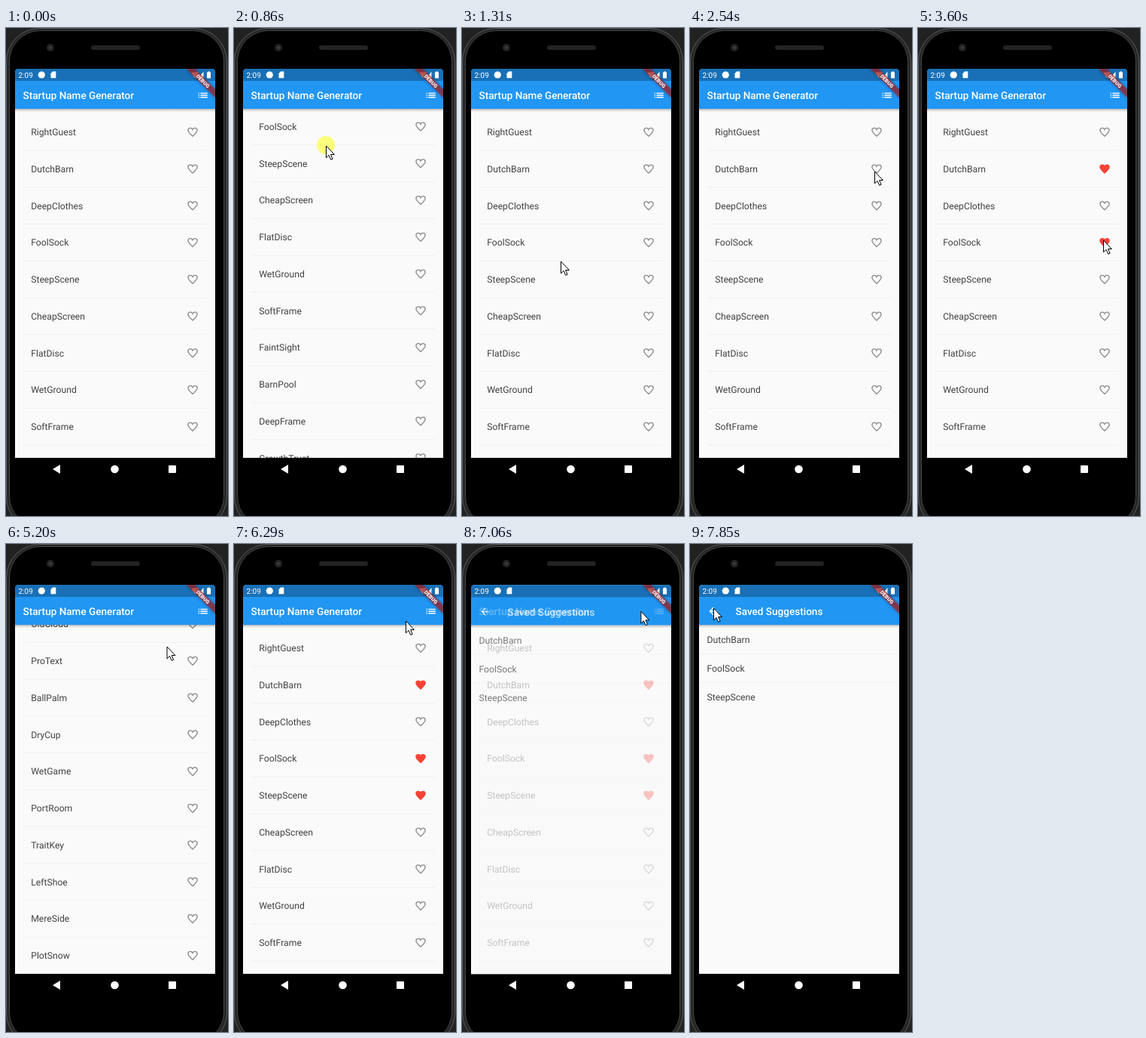
Animation, 295 px wide and 646 px high, one loop 8000 ms. Source, as an HTML page:

```html
<!DOCTYPE html>
<html lang="en">
<head>
<meta charset="utf-8">
<title>Startup Name Generator</title>
<style>
  html, body { margin: 0; height: 100%; overflow: hidden; background: #222; }
  svg { display: block; width: 100vw; height: 100vh; }
  text { font: 12.2px Roboto, "Noto Sans", sans-serif; fill: #424242; text-rendering: geometricPrecision; }
  .title { font-size: 13.55px; font-weight: 500; fill: #fff; }
  .line { stroke: #f0f0f0; }
  .white { fill: #fff; }
  .icon { fill: none; stroke: #fff; stroke-width: 2; }
  .ribbon { filter: drop-shadow(0 0 2px rgba(0, 0, 0, .5)); }
</style>
</head>
<body>
<svg viewBox="0 0 295 646">
  <defs>
    <clipPath id="screen"><rect x="12" y="54" width="266" height="560" rx="5"/></clipPath>
    <clipPath id="body"><rect x="12" y="107" width="266" height="462"/></clipPath>
    <linearGradient id="shade" x2="0" y2="1">
      <stop stop-opacity=".25"/><stop offset="1" stop-opacity="0"/>
    </linearGradient>
    <rect id="page" x="12" y="54" width="266" height="515" fill="#fafafa"/>
    <g id="bar">
      <rect x="12" y="107" width="266" height="4" fill="url(#shade)"/>
      <rect x="12" y="54" width="266" height="53" fill="#2196f3"/>
      <rect x="12" y="54" width="266" height="16" fill="#1970b6"/>
    </g>
  </defs>

  <!-- phone -->
  <rect x=".5" y=".5" width="293" height="664" rx="44" fill="#262626" stroke="#5a5a5a"/>
  <rect x="4.5" y="3.5" width="285" height="657" rx="41" stroke="#444"/>
  <circle cx="59" cy="26" r="5" fill="#232323"/>
  <circle cx="59" cy="26" r="2.2" fill="#3a3a3a"/>
  <rect x="113" y="23" width="65" height="6" rx="3" fill="#232323"/>
  <g class="white">
    <path d="M62 584L72 578V590Z"/>
    <circle cx="144.5" cy="584" r="5.3"/>
    <rect x="216" y="579" width="10" height="10" rx=".8"/>
  </g>

  <g clip-path="url(#screen)">
    <use href="#page"/>
    <g clip-path="url(#body)">
      <g id="list"></g>
      <ellipse id="glow" cx="145" cy="107" rx="170" fill="#2196f3"/>
    </g>
    <use href="#bar"/>
    <text class="title" x="22.5" y="94.2">Startup Name Generator</text>
    <path class="icon" transform="translate(253.6 80.9) scale(.677)"
      stroke-dasharray="2 2 14 9" d="M3 8H21M3 12H21M3 16H21"/>

    <g id="saved">
      <use href="#page"/>
      <g id="picks"></g>
      <use href="#bar"/>
      <path class="icon" transform="translate(22.8 80.9) scale(.677)" d="M20 12H5.4M12.7 4.7L5.4 12L12.7 19.3"/>
      <text class="title" x="60.5" y="94.2">Saved Suggestions</text>
    </g>

    <!-- status bar and ribbon -->
    <g class="white">
      <text x="16.5" y="65.7" style="font-size:10px;fill:#fff">2:09</text>
      <circle cx="47.3" cy="62" r="4.6"/>
      <path d="M59.5 60.2L62 57.5H66.3V66.3H59.5Z"/>
      <path d="M246 58.5H256L251 66Z"/>
      <path d="M255 66L262.5 58V66Z"/>
      <path d="M267 58.6h1.4v-1h2.2v1h1.4v7.8h-5z"/>
    </g>
    <g transform="translate(278 54) rotate(45)">
      <rect class="ribbon" x="-27" y="19" width="54" height="8.1" fill="#b71c1c" fill-opacity=".63"/>
      <text y="25.5" text-anchor="middle" style="font-size:6.9px;font-weight:900;fill:#fff">DEBUG</text>
    </g>
  </g>

  <g id="cursor">
    <circle id="press" r="12" fill="#ff0" fill-opacity=".5"/>
    <path d="M.5 1V16.8L4.1 13.4L6.7 19.3L9.1 18.3L6.6 12.5H11.4Z" fill="#fff" stroke="#000"/>
  </g>
</svg>
<script>
const $ = id => document.getElementById(id);
const set = (el, attrs) => Object.entries(attrs).forEach(([k, v]) => el.setAttribute(k, v));

const names = ('RightGuest DutchBarn DeepClothes FoolSock SteepScene CheapScreen FlatDisc WetGround ' +
  'SoftFrame FaintSight BarnPool DeepFrame GrowthTrust OldCloud ProText BallPalm DryCup WetGame ' +
  'PortRoom TraitKey LeftShoe MereSide PlotSnow').split(' ');
const likes = { 1: 2700, 3: 3480, 4: 4000 };   // row: time of the tap
const openAt = 6810;
const rowGap = 48.75, pickGap = 38;
const heart = 'M12 20C6 14.6 3 11.9 3 8.5 3 6 5 4 7.5 4 9.4 4 11.2 5.2 12 7 12.8 5.2 14.6 4 16.5 4 ' +
  '19 4 21 6 21 8.5 21 11.9 18 14.6 12 20Z';

const divider = (x1, x2, y) => `<path class="line" d="M${x1} ${y}H${x2}"/>`;

$('list').innerHTML = names.map((name, i) => `<g transform="translate(0 ${137.8 + i * rowGap})">
  <text x="33.2" y="4.3">${name}</text>
  <path class="heart" d="${heart}" stroke-width="2" transform="translate(239.9 -8.1) scale(.677)"/>
  ${divider(22.8, 267, 24.3)}</g>`).join('');
const hearts = document.querySelectorAll('.heart');

$('picks').innerHTML = Object.keys(likes).map((row, i) =>
  `<text x="22.5" y="${131.2 + i * pickGap}">${names[row]}</text>` +
  (i < 2 ? divider(12, 278, 145.5 + i * pickGap) : '')).join('');

// Places where the pointer rests: arrival, departure, x, y
const stops = [
  [110, 110, 131, 360], [230, 420, 131, 308], [860, 860, 122, 155], [1260, 1400, 131, 308],
  [2010, 2070, 208, 201], [2200, 2380, 230, 182], [2530, 2800, 245, 189], [3160, 3600, 246, 280],
  [3850, 4160, 248, 338], [4420, 4462, 190, 500.5], [4980, 5260, 213.5, 135], [5780, 5830, 208, 410],
  [6290, 6290, 228, 101], [6550, 6920, 259, 86], [7510, 7580, 109, 102], [7840, 8000, 31, 84]
];
const drags = [[420, 1260], [4440, 4960], [5270, 5640]];
const taps = [...Object.values(likes), openAt];

const ramp = (t, a, b) => Math.min(1, Math.max(0, (t - a) / (b - a)));
const ease = (t, a, b) => { const u = ramp(t, a, b); return u * u * (3 - 2 * u); };

function pointer(t) {
  let [, leave, x, y] = stops[0];
  for (const [arrive, next, nx, ny] of stops.slice(1)) {
    const u = ease(t, leave, arrive);
    x += (nx - x) * u;
    y += (ny - y) * u;
    leave = next;
  }
  return `translate(${x} ${y})`;
}

const scroll = t => 153.5 * (ease(t, 420, 860) - ease(t, 860, 1260)) +
  665.5 * (ease(t, 4462, 5150) - ease(t, 5260, 5660));

function draw(t) {
  set($('list'), { transform: `translate(0 ${-scroll(t)})` });
  hearts.forEach((el, i) => {
    const on = t >= likes[i];
    set(el, { fill: on ? '#f44336' : 'none', stroke: on ? '#f44336' : '#8c8c8c' });
  });

  const glow = Math.sin(Math.PI * ramp(t, 5630, 6050));
  set($('glow'), { ry: 22 * glow, opacity: .16 * glow });

  const open = ramp(t, openAt, openAt + 300);
  set($('saved'), { opacity: open * open, transform: `translate(0 ${136 * (1 - open) ** 3})` });

  const pressed = drags.some(([a, b]) => t >= a && t < b) || taps.some(a => Math.abs(t - a) < 80);
  set($('cursor'), { transform: pointer(t), opacity: t < 110 ? 0 : 1 });
  set($('press'), { opacity: pressed ? 1 : 0 });
}

const start = performance.now();
function tick() {
  draw((performance.now() - start) % 8000);
  requestAnimationFrame(tick);
}
tick();
</script>
</body>
</html>
```
